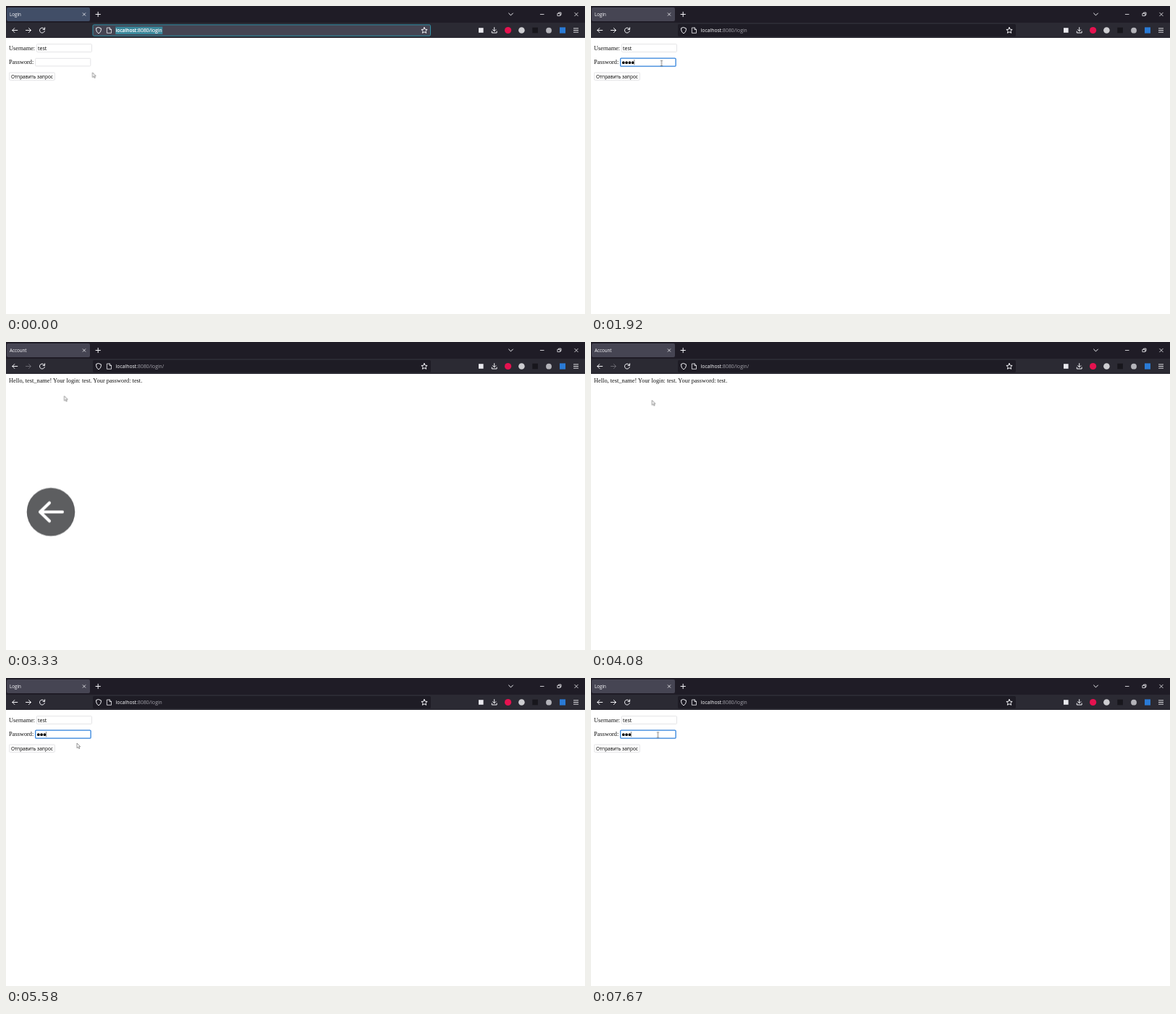
An HTML page that plays this animation: 800x425 px, repeating every 8 s.

```html
<!DOCTYPE html>
<html lang="en">
<head>
<meta charset="utf-8">
<title>Login form</title>
<style>
html, body { margin: 0; width: 100%; height: 100%; overflow: hidden; background: #fff; }
svg { display: block; width: 800px; height: 425px; }
text { white-space: pre; }
.ui { font-family: "Open Sans", "Noto Sans", sans-serif; }
.serif { font: 8.333px "Liberation Serif", "Noto Serif", serif; fill: #111; }
.icon { fill: none; stroke: #f4f4f8; stroke-width: 1; stroke-linecap: round; stroke-linejoin: round; }
.thin { stroke-width: .8; }

/* hard switches */
.login, .account, .hello, .missing, .urlfocus, .focus, .typed, .field { animation: 8s step-end infinite; }
.login { animation-name: login; }
.account { animation-name: account; }
.hello { animation-name: hello; }
.missing { animation-name: missing; }
.urlfocus { animation-name: urlfocus; }
.field { animation-name: field; }
.focus { animation-name: focus; }
.typed { animation-name: typed; }
@keyframes login {
  0%, 57.375%, 90.625% { visibility: visible; }
  27.25%, 73.75% { visibility: hidden; }
}
@keyframes account {
  0%, 57.375%, 90.625% { visibility: hidden; }
  27.25%, 73.75% { visibility: visible; }
}
@keyframes hello {
  0%, 57.375% { visibility: hidden; }
  27.25% { visibility: visible; }
}
@keyframes missing {
  0%, 90.625% { visibility: hidden; }
  73.75% { visibility: visible; }
}
@keyframes urlfocus { 0% { opacity: 1; } 12.5% { opacity: 0; } }
@keyframes field { 0% { stroke: #dedee0; } 9.375% { stroke: #a9a9ad; } }
@keyframes focus { 0% { opacity: 0; } 12.5% { opacity: 1; } }
@keyframes typed {
  0%, 12.5% { transform: translateX(0); }
  18.75% { transform: translateX(4.3px); }
  19.75% { transform: translateX(8.6px); }
  20.875% { transform: translateX(12.9px); }
  24% { transform: translateX(17.2px); }
  69.75%, 100% { transform: translateX(12.9px); }
}

/* pointer */
.arrow { animation: move 8s linear infinite, arrow 8s step-end infinite; }
.beam { animation: beam 8s step-end infinite; }
@keyframes move {
  0%, 2.2% { transform: translate(119.5px, 91.8px); }
  7.2% { transform: translate(98px, 76px); }
  35.5% { transform: translate(96px, 74.5px); }
  37.5%, 50% { transform: translate(80.5px, 74.5px); }
  53.1%, 54.3% { transform: translate(92px, 92.5px); }
  56.2%, 59.4% { transform: translate(109px, 96.3px); }
  63.5%, 89.6% { transform: translate(98px, 90px); }
  93%, 100% { transform: translate(92px, 76px); }
}
@keyframes arrow {
  0%, 36.5% { opacity: 1; }
  7.2%, 92.7% { opacity: 0; }
}
@keyframes beam {
  0%, 36.5% { opacity: 0; transform: translate(97.5px, 79px); }
  7.2% { opacity: 1; transform: translate(97.5px, 79px); }
  92.7%, 100% { opacity: 1; transform: translate(92.5px, 78.5px); }
}

/* repeated effects, each started at its own time */
.burst, .swipe, .peek { animation: 8s linear infinite; animation-delay: calc(var(--at) - 8s); opacity: 0; }
.burst { animation-name: burst; }
.swipe { animation-name: swipe; }
.peek { animation-name: peek; }
@keyframes burst {
  0% { transform: scale(6); opacity: .55; }
  1% { transform: scale(37); opacity: .55; }
  2.5% { transform: scale(118); opacity: .32; }
  4% { transform: scale(118); opacity: .13; }
  4.95% { transform: scale(118); opacity: .12; }
  5%, 100% { transform: scale(118); opacity: 0; }
}
@keyframes peek {
  0% { transform: translate(40px, 234.5px); opacity: .4; }
  1%, 4.2% { transform: translate(62px, 234.5px); opacity: 1; }
  9.3%, 100% { transform: translate(38px, 234.5px); opacity: 0; }
}
@keyframes swipe {
  0% { transform: translate(48px, 234.5px); opacity: .5; }
  1.1%, 2.1% { transform: translate(92px, 234.5px); opacity: 1; }
  3.1% { transform: translate(92px, 234.5px); opacity: .63; }
  7.4%, 100% { transform: translate(92px, 234.5px); opacity: 0; }
}
</style>
</head>
<body>
<svg viewBox="0 0 800 425">
  <defs>
    <clipPath id="tab"><rect x="1" y="2" width="115" height="19" rx="2"/></clipPath>
    <g id="back">
      <circle r="33.3" fill="#5d5e60"/>
      <path d="M16 0H-15M-2-12.5L-15 0L-2 12.5" fill="none" stroke="#fff" stroke-width="4.2" stroke-linecap="round" stroke-linejoin="round"/>
    </g>
  </defs>
  <rect width="800" height="425" fill="#fff"/>

  <!-- tab strip -->
  <rect width="800" height="44" fill="#1f1c26"/>
  <rect y="23" width="800" height="20.5" fill="#2b2a33"/>
  <g clip-path="url(#tab)">
    <rect x="1" y="2" width="115" height="19" fill="#464553"/>
    <g transform="translate(5 11.5)" fill="#2b8cf0">
      <circle class="burst" r="1" style="--at:-.32s"/>
      <circle class="burst" r="1" style="--at:2.18s"/>
      <circle class="burst" r="1" style="--at:4.59s"/>
      <circle class="burst" r="1" style="--at:5.9s"/>
      <circle class="burst" r="1" style="--at:7.25s"/>
    </g>
  </g>
  <g class="ui" font-size="6.25" fill="#fbfbfe">
    <text class="login" x="5" y="14">Login</text>
    <text class="account" x="5" y="14">Account</text>
  </g>
  <g class="icon thin">
    <path d="M106.2 9.7l3.6 3.6m0-3.6l-3.6 3.6"/>
    <path d="M124 11.5h6.4m-3.2-3.2v6.4" stroke-width="1"/>
    <path d="M694.6 10l2.9 2.9l2.9-2.9" stroke-width="1"/>
    <path d="M738.3 11.5h4.8"/>
    <path d="M762.3 10.2h3.4v3.4h-3.4zM763.6 10.2v-1.2h3.4v3.4h-1.3"/>
    <path d="M785.7 9.2l4.6 4.6m0-4.6l-4.6 4.6"/>
  </g>

  <!-- toolbar -->
  <g class="icon">
    <path d="M15.8 33.5h-7m3-3l-3 3l3 3"/>
    <path d="M27.5 33.5h7m-3-3l3 3l-3 3" stroke="#68676f"/>
    <path class="login" d="M27.5 33.5h7m-3-3l3 3l-3 3"/>
    <path d="M53.2 32.2a3.5 3.5 0 1 0 .2 2.2M53.6 29.8v2.6h-2.6"/>
  </g>
  <rect x="120" y="25" width="467" height="17" rx="2" fill="#1e1c25"/>
  <g class="urlfocus">
    <rect x="120" y="25.9" width="466.5" height="15.3" rx="1.5" fill="#454452" stroke="#3393a8"/>
    <rect x="151.3" y="28.6" width="65" height="10.4" fill="#3a899c"/>
  </g>
  <g class="ui" font-size="6.85">
    <text x="151.6" y="36.3" fill="#fbfbfe">localhost<tspan fill="#a3a2aa">:8080/login</tspan><tspan class="account" fill="#a3a2aa">/</tspan></text>
    <text class="urlfocus" x="151.6" y="36.3" fill="#fbfbfe">localhost:8080/login</text>
  </g>
  <g class="icon">
    <path d="M128 29.6l3.4 1.3c.2 3.4-1 5.6-3.4 6.9c-2.4-1.3-3.6-3.5-3.4-6.9z"/>
    <path class="thin" d="M139.8 30h3.4l2.3 2.3v5h-5.7zM143 30v2.5h2.5"/>
    <path d="M578 29.5l1.2 2.7l2.9.3l-2.2 1.9l.7 2.9l-2.6-1.5l-2.6 1.5l.7-2.9l-2.2-1.9l2.9-.3z"/>
    <path d="M674.7 29.6v5.2m-2.2-2.2l2.2 2.2l2.2-2.2M671.3 35v2h6.8v-2"/>
    <path d="M784.4 30.9h6.2m-6.2 2.6h6.2m-6.2 2.6h6.2" stroke-width=".9"/>
  </g>
  <rect x="653" y="30.2" width="6.6" height="6.6" fill="#e9e9ee"/>
  <circle cx="693.6" cy="33.5" r="4.6" fill="#e5124f"/>
  <circle cx="712.4" cy="33.5" r="4.3" fill="#cdcdd1"/>
  <rect x="727.3" y="29.7" width="7.6" height="7.6" fill="#17161c"/>
  <circle cx="750" cy="33.7" r="3.9" fill="#b4b4ba"/>
  <rect x="765" y="29.4" width="8" height="8.2" fill="#2a7bd6"/>

  <!-- login page -->
  <g class="login">
    <text class="serif" x="4.1" y="61">Username:</text>
    <text class="serif" x="4.1" y="80.4">Password:</text>
    <g fill="#fff" stroke="#dedee0" stroke-width=".8">
      <rect x="42.3" y="52.6" width="76.2" height="10.8" rx="1"/>
      <rect class="field" x="40.6" y="72.3" width="76.2" height="10.6" rx="1"/>
      <rect x="4.4" y="91.9" width="63" height="10.4" rx="1.2" fill="#fdfdfd"/>
    </g>
    <g class="ui" fill="#000">
      <text x="44.1" y="60.8" font-size="6.94">test</text>
      <text x="7" y="99.5" font-size="6.5">Отправить запрос</text>
    </g>
    <g class="focus">
      <rect x="40.7" y="72.1" width="76.4" height="11" rx="1.2" fill="#fff" stroke="#3586e0" stroke-width="1.3"/>
      <path d="M44.8 78.2h13" stroke="#000" stroke-width="3.7" stroke-linecap="round" stroke-dasharray="0 4.3"/>
      <g class="typed">
        <rect x="42.6" y="74" width="20" height="7.6" fill="#fff"/>
        <path d="M42.6 74v7.3" stroke="#333" stroke-width=".6"/>
      </g>
    </g>
  </g>

  <!-- result pages -->
  <text class="serif hello" x="4.1" y="56.3">Hello, test_name! Your login: test. Your password: test.</text>
  <text class="serif missing" x="4.1" y="56.3">User not found</text>

  <!-- back gesture -->
  <g class="peek" style="--at:3.25s"><use href="#back"/></g>
  <g class="swipe" style="--at:4.42s"><circle r="34.3" fill="#d3d3de"/><use href="#back"/></g>
  <g class="swipe" style="--at:7.08s"><circle r="34.3" fill="#d3d3de"/><use href="#back"/></g>

  <!-- pointer -->
  <path class="arrow" d="M0 0v6.6l1.6-1.4l1.1 2.4l1.1-.5l-1.1-2.4h2z" fill="#fff" stroke="#555" stroke-width=".6" stroke-linejoin="round"/>
  <path class="beam" d="M-1.4-3.6h1q.4 0 .4.5v6.2q0 .5-.4.5h-1M1.4-3.6h-1q-.4 0-.4.5M1.4 3.6h-1q-.4 0-.4-.5" fill="none" stroke="#444" stroke-width=".7"/>
</svg>
</body>
</html>
```
